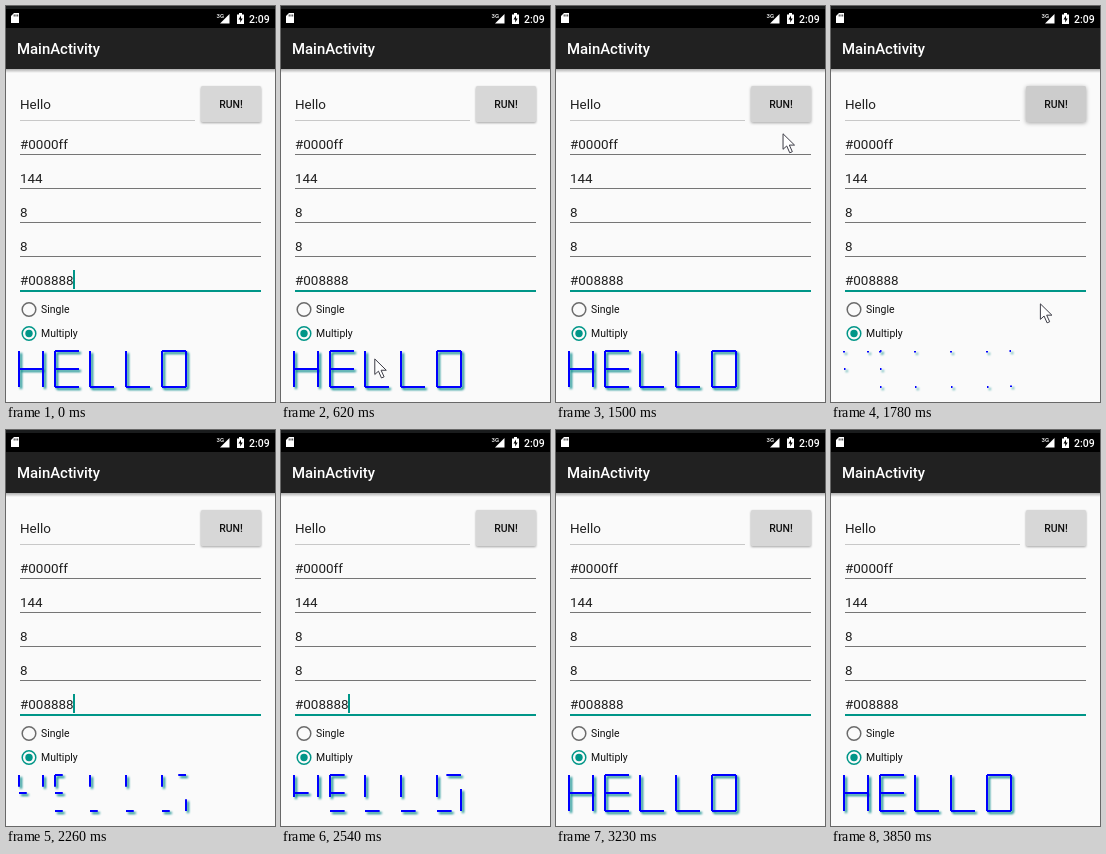
Recreate the animation shown at these times as an HTML page. Size 269 by 396 pixels, loop 4290 ms.

```html
<!DOCTYPE html>
<html lang="en">
<head>
<meta charset="utf-8">
<title>Stroke text demo</title>
<style>
  html, body { margin: 0; width: 100%; height: 100%; overflow: hidden; background: #fafafa; }
  svg { display: block; width: 269px; height: 396px; font-family: Roboto, sans-serif; }
  .bar { fill: #fff; font-weight: 500; }
  .field { font-size: 13.45px; fill: #212121; }
  .small { font-size: 10.46px; fill: #111; }
  .rule { stroke: #757575; }
  #word { fill: none; stroke: #00f; stroke-width: 2; filter: drop-shadow(2px 2px 1.1px #088); }
</style>
</head>
<body>
<svg viewBox="0 0 269 396">
  <defs>
    <linearGradient id="fade" x2="0" y2="1">
      <stop stop-opacity=".3"/>
      <stop offset="1" stop-opacity="0"/>
    </linearGradient>
  </defs>
  <rect width="269" height="396" fill="#fafafa"/>

  <!-- status bar and title -->
  <rect width="269" height="23" fill="#000"/>
  <rect width="269" height="3" fill="#1a1c1d"/>
  <rect y="22" width="269" height="41" fill="#212121"/>
  <rect y="63" width="269" height="4" fill="url(#fade)"/>
  <path d="M8 7h5v10H5V10Z" fill="#fff"/>
  <path d="M8.2 8.5v2M10 8.5v2M11.7 8.5v2" stroke="#000" stroke-width=".8"/>
  <text class="bar" x="210.5" y="12" font-size="6">3G</text>
  <path d="M223.500 8v9.500h-9.500Z" fill="#fff"/>
  <path d="M231 8.500h2V7h3v1.500h2V18h-7Z" fill="#fff"/>
  <path d="M235 9.500l-2.500 4h1.700v3l2.500-4h-1.700Z" fill="#000"/>
  <text class="bar" x="243" y="16.500" font-size="10.46">2:09</text>
  <text class="bar" x="11" y="48" font-size="14.9">MainActivity</text>

  <!-- form -->
  <g class="field">
    <text x="14" y="103">Hello</text>
    <text x="14" y="143">#0000ff</text>
    <text x="14" y="177">144</text>
    <text x="14" y="211">8</text>
    <text x="14" y="245">8</text>
    <text x="14" y="279">#008888</text>
  </g>
  <path d="M14 114.500H189" stroke="#c8c8c8"/>
  <path class="rule" d="M14 148.500H255M14 182.500H255M14 216.500H255M14 250.500H255"/>
  <rect x="14" y="284" width="241" height="2" fill="#009688"/>
  <rect id="caret" x="67" y="264" width="2" height="19" fill="#009688"/>
  <rect id="button" x="195" y="80" width="60" height="36" rx="1.500"/>
  <text class="small" x="225" y="102" text-anchor="middle" font-weight="500">RUN!</text>
  <g fill="none" stroke-width="1.500">
    <circle cx="23" cy="303.500" r="6.800" stroke="#6b6b6b"/>
    <circle cx="23" cy="327.500" r="6.800" stroke="#009688"/>
  </g>
  <circle cx="23" cy="327.500" r="3.700" fill="#009688"/>
  <text class="small" x="35" y="307">Single</text>
  <text class="small" x="35" y="331">Multiply</text>

  <path id="word"/>
  <path id="cursor" d="M.5 .5V16l3.700-3.300 3 6.800 2.600-1.100-3-6.600H12Z" fill="#fff" stroke="#3c3c46"/>
</svg>
<script>
const LOOP = 4290, DRAW_START = 1680, DRAW_TIME = 1510;
const byId = id => document.getElementById(id);
const [caret, button, word, cursor] = ['caret', 'button', 'word', 'cursor'].map(byId);

// Strokes as x, y, dx, dy on a cell of 24 by 36
const W = 24, H = 36, M = 18;
const left = [0, 0, 0, H], base = [0, H, W, 0], mid = [0, M, W, 0];
const glyphs = {
  H: [left, [W, 0, 0, H], mid],
  E: [left, [0, 0, W, 0], mid, base],
  L: [left, base],
  O: [left, base, [W, H, 0, -H], [W, 0, -W, 0]]
};

// time, x, y
const track = [
  [620, 93, 353], [850, 158, 228], [1090, 224, 104], [1150, 227, 99],
  [1450, 227, 99], [1560, 226, 160], [1670, 223, 251], [1780, 209, 297], [1900, 195, 340]
];
const caretOn = [[0, 250], [740, 1250], [2230, 2770], [3350, 3850]];

const ramp = (t, a, b) => Math.min(1, Math.max(0, (t - a) / (b - a)));

function wordPath(p) {
  return [...'HELLO'].map((c, i) => glyphs[c].map(([x, y, dx, dy]) => {
    const k = Math.max(p, 1.5 / Math.hypot(dx, dy));
    return `M${Math.floor(13.3 + 35.7 * i) + x} ${345 + y}l${dx * k} ${dy * k}`;
  }).join('')).join('');
}

function moveCursor(t) {
  const i = track.findIndex(([end]) => t < end);
  cursor.style.display = i > 0 ? '' : 'none';
  if (i < 1) return;
  const [t0, x0, y0] = track[i - 1], [t1, x1, y1] = track[i], k = ramp(t, t0, t1);
  cursor.setAttribute('transform', `translate(${x0 + (x1 - x0) * k} ${y0 + (y1 - y0) * k})`);
}

function render(t) {
  caret.style.display = caretOn.some(([a, b]) => t >= a && t < b) ? '' : 'none';

  const press = ramp(t, 1450, 1600) * (1 - ramp(t, 1790, 2200));
  const grey = 214.5 - 11 * press;
  button.style.fill = `rgb(${grey},${grey},${grey})`;
  button.style.filter = `drop-shadow(0 1px ${1 + press}px rgba(0,0,0,.35))`;

  const p = t < DRAW_START ? 1 : (1 - Math.cos(Math.PI * ramp(t, DRAW_START, DRAW_START + DRAW_TIME))) / 2;
  word.setAttribute('d', wordPath(p));
  moveCursor(t);
}

const start = performance.now();
function tick() {
  render((performance.now() - start) % LOOP);
  requestAnimationFrame(tick);
}
tick();
</script>
</body>
</html>
```
